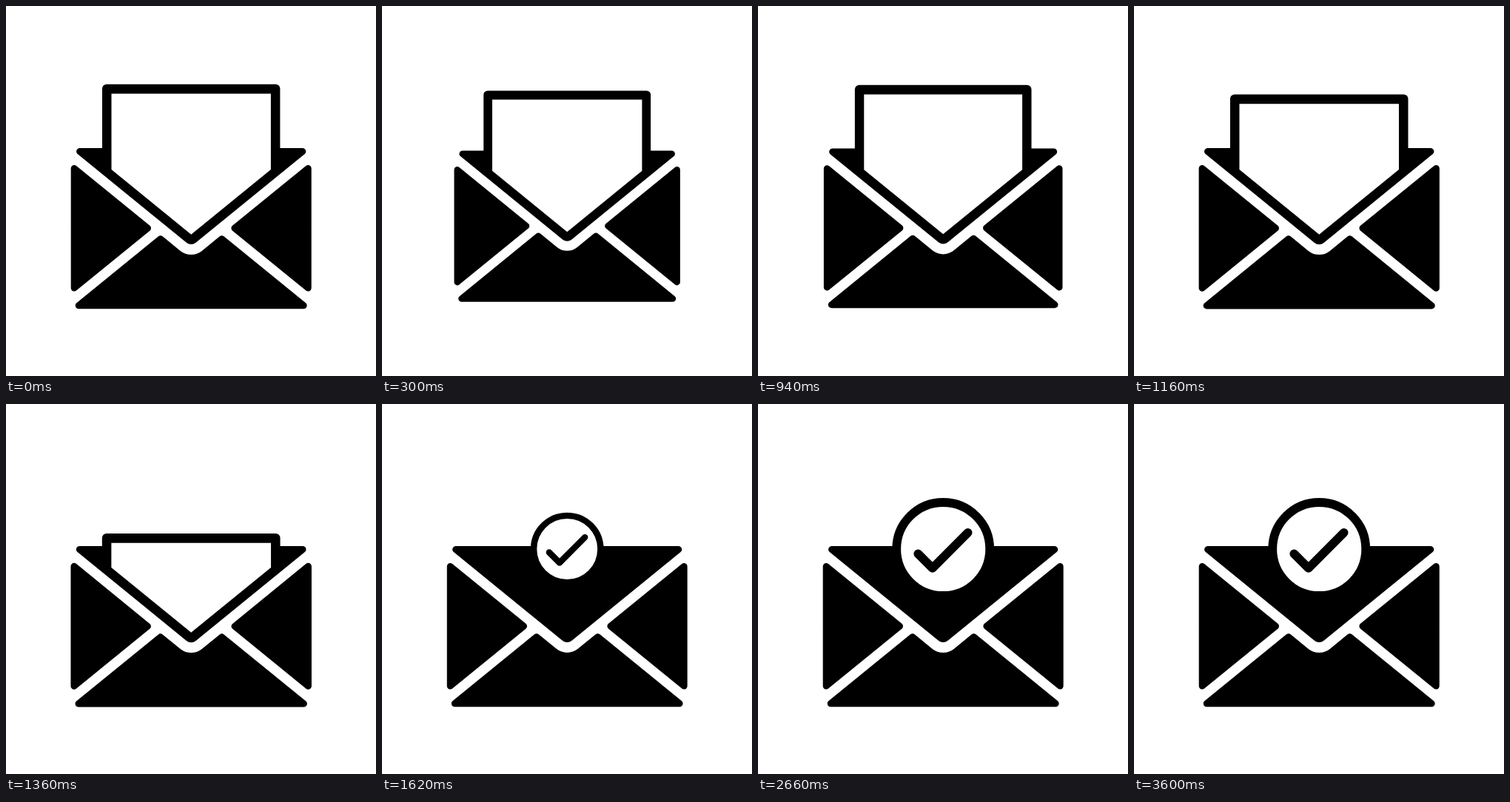
These frames come from a looping animation (500x500 px, 3.84 s). An HTML page with a canvas:

```html
<!DOCTYPE html>
<html lang="en">
<head>
<meta charset="utf-8">
<title>Envelope</title>
<style>
  html, body { margin: 0; width: 100%; height: 100%; overflow: hidden; background: #fff; }
  canvas { display: block; width: 500px; height: 500px; }
</style>
</head>
<body>
<canvas id="stage" width="500" height="500"></canvas>
<script>
const ctx = document.getElementById('stage').getContext('2d');
const LOOP = 3840;
const MID = 250.2;
const SLOPE = 0.814;   // pitch of all diagonal edges
const CORNER = 4.5;

const progress = (t, start, length) => Math.min(1, Math.max(0, (t - start) / length));
const quadIn = p => p * p;
const quadOut = p => p * (2 - p);

function elasticOut(p, period) {
  if (p <= 0) return 0;
  if (p >= 1) return 1;
  return 1 + 2 ** (-10 * p) * Math.sin((p - period / 4) * 2 * Math.PI / period);
}

// Scales the drawing around a point.
function scaleAround(x, y, s) {
  ctx.translate(x, y);
  ctx.scale(s, s);
  ctx.translate(-x, -y);
}

// Fills a polygon whose corners [x, y] are rounded by an outline.
function softPolygon(points) {
  ctx.beginPath();
  points.forEach(([x, y]) => ctx.lineTo(x, y));
  ctx.closePath();
  ctx.fill();
  ctx.lineWidth = CORNER * 2;
  ctx.stroke();
}

// Fills a polygon with corners [x, y, radius].
function roundedPolygon(points) {
  const n = points.length;
  const [ax, ay] = points[0];
  const [bx, by] = points[n - 1];
  ctx.beginPath();
  ctx.moveTo((ax + bx) / 2, (ay + by) / 2);
  points.forEach(([x, y, r], i) => {
    const [nx, ny] = points[(i + 1) % n];
    ctx.arcTo(x, y, nx, ny, r);
  });
  ctx.closePath();
  ctx.fill();
}

function drawFlap() {
  const top = 192.1, apex = 325;
  const half = (apex - top) / SLOPE;
  roundedPolygon([
    [MID - half, top, CORNER],
    [MID + half, top, CORNER],
    [MID, apex, 10]
  ]);
}

function drawSides() {
  for (const side of [-1, 1]) {
    const x = d => MID + side * d;
    softPolygon([[x(158), 219.4], [x(58.7), 300.3], [x(158), 381.1]]);
  }
}

function drawFront() {
  const base = 409.3, dip = 342.7;
  const peakY = (dip + 275.3) / 2;
  const peakX = (dip - peakY) / SLOPE;
  const half = peakX + (base - peakY) / SLOPE;
  roundedPolygon([
    [MID - half, base, CORNER],
    [MID - peakX, peakY, CORNER],
    [MID, dip, 23],
    [MID + peakX, peakY, CORNER],
    [MID + half, base, CORNER]
  ]);
}

function drawLetter(drop) {
  const top = 105.7 + drop, inner = 118.5 + drop;
  const half = 107.7, tip = 308.7;
  const shoulder = tip - half * SLOPE;
  if (top < 206) {
    ctx.beginPath();
    ctx.roundRect(MID - 120.2, top, 240.4, 220 - top, [6, 6, 0, 0]);
    ctx.fill();
  }
  if (inner >= tip) return;
  // The paper narrows once its top edge sinks into the pocket.
  const y = Math.max(inner, shoulder);
  const w = (tip - y) / SLOPE;
  ctx.fillStyle = '#fff';
  ctx.beginPath();
  ctx.moveTo(MID - w, inner);
  ctx.lineTo(MID + w, inner);
  ctx.lineTo(MID + w, y);
  ctx.lineTo(MID, tip);
  ctx.lineTo(MID - w, y);
  ctx.fill();
  ctx.fillStyle = '#000';
}

function drawBadge(s) {
  if (s <= 0) return;
  const cy = 196;
  ctx.save();
  scaleAround(MID, cy, s);
  ctx.beginPath();
  ctx.arc(MID, cy, 63, 0, Math.PI * 2);
  ctx.fillStyle = '#fff';
  ctx.fill();
  ctx.lineWidth = 11.8;
  ctx.stroke();
  ctx.restore();
}

function drawCheck(s) {
  if (s <= 0) return;
  ctx.save();
  scaleAround(MID, 196, s);
  ctx.lineWidth = 11.8;
  ctx.beginPath();
  ctx.moveTo(216.3, 202.3);
  ctx.lineTo(235.8, 221.8);
  ctx.lineTo(283.6, 173.8);
  ctx.stroke();
  ctx.restore();
}

function draw(t) {
  const shrink = quadOut(progress(t, 200, 200));
  const recover = elasticOut(progress(t, 515, 1700), 0.3);
  const drop = 191.5 * quadIn(progress(t, 1000, 600));
  const badge = elasticOut(progress(t, 1500, 1060), 0.8);

  ctx.fillStyle = '#fff';
  ctx.fillRect(0, 0, 500, 500);
  ctx.save();
  ctx.fillStyle = ctx.strokeStyle = '#000';
  ctx.lineJoin = ctx.lineCap = 'round';
  scaleAround(250, 250, 1 - 0.08 * shrink * (1 - recover));
  drawFlap();
  drawLetter(drop);
  drawSides();
  drawFront();
  drawBadge(badge);
  drawCheck(Math.min(1, badge));
  ctx.restore();
}

const begin = performance.now();
function tick() {
  draw((performance.now() - begin) % LOOP);
  requestAnimationFrame(tick);
}
tick();
</script>
</body>
</html>
```
